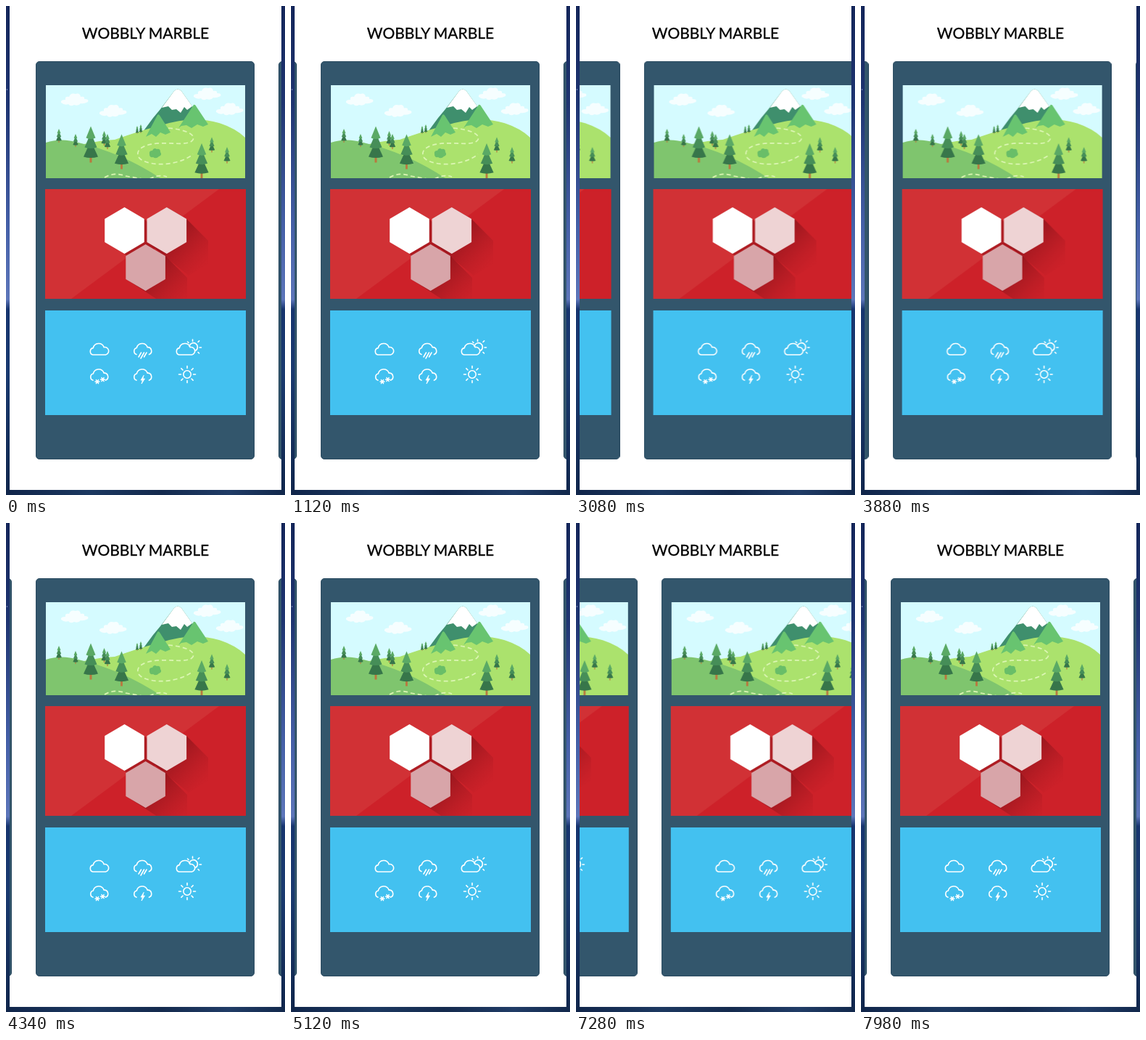
An HTML page for the animation above (8020 ms loop, 385 px wide and 673 px high).

```html
<!DOCTYPE html>
<html lang="en">
<head>
<meta charset="utf-8">
<title>Card carousel</title>
<style>
html, body { margin: 0; width: 100%; height: 100%; overflow: hidden; }
svg { display: block; width: 100%; height: 100%; }
.title { font: 21px Lato, "Open Sans", sans-serif; text-anchor: middle; stroke: #000; stroke-width: .3; }
.icons { fill: none; stroke: #fff; stroke-width: 1.6; stroke-linecap: round; stroke-linejoin: round; }
.trail { fill: none; stroke: #dcf6b4; stroke-width: 1.7; stroke-dasharray: 6 4; }

/* one page = 335px */
#strip { animation: swipe 8020ms cubic-bezier(.3, 0, .2, 1) infinite; }
@keyframes swipe {
  0%, 6.733% { transform: translateX(0); }
  13.965%, 21.696% { transform: translateX(-335px); }
  27.681%, 35.411% { transform: translateX(-670px); }
  40.898%, 48.13% { transform: translateX(-1005px); }
  54.115%, 58.603% { transform: translateX(-670px); }
  63.84%, 75.062% { transform: translateX(-335px); }
  79.8%, 88.529% { transform: translateX(-670px); }
  93.267%, 100% { transform: translateX(-1005px); }
}
</style>
</head>
<body>
<svg viewBox="0 0 385 673" preserveAspectRatio="none">
<defs>
  <linearGradient id="night" x1="0" y1="0" x2="0" y2="1">
    <stop offset="0" stop-color="#14265a"/>
    <stop offset=".2" stop-color="#1f3572"/>
    <stop offset=".45" stop-color="#4560a8"/>
    <stop offset=".6" stop-color="#5d76ba"/>
    <stop offset=".62" stop-color="#17356f"/>
    <stop offset=".75" stop-color="#1a3a70"/>
    <stop offset="1" stop-color="#10264c"/>
  </linearGradient>
  <linearGradient id="ground">
    <stop offset="0" stop-color="#10254a"/>
    <stop offset=".3" stop-color="#1c3860"/>
    <stop offset=".55" stop-color="#142a4e"/>
    <stop offset=".8" stop-color="#203c66"/>
    <stop offset="1" stop-color="#12284c"/>
  </linearGradient>
  <linearGradient id="shade" gradientUnits="userSpaceOnUse" x1="225" y1="320" x2="267" y2="362">
    <stop offset="0" stop-color="#8e141b" stop-opacity=".8"/>
    <stop offset="1" stop-color="#a81a22" stop-opacity=".04"/>
  </linearGradient>
  <linearGradient id="shade2" gradientUnits="userSpaceOnUse" x1="196" y1="371" x2="238" y2="413">
    <stop offset="0" stop-color="#8e141b" stop-opacity=".8"/>
    <stop offset="1" stop-color="#a81a22" stop-opacity=".04"/>
  </linearGradient>
  <clipPath id="screen"><path d="M5 0H380V666H5z"/></clipPath>
  <clipPath id="meadow"><path d="M55 109H330V237H55z"/></clipPath>
  <clipPath id="redBox"><path d="M54 252H331V403H54z"/></clipPath>

  <g id="tree">
    <path fill="#b9783f" d="M-1.5-8h3V0h-3z"/>
    <path fill="#37764a" d="M0-30L10-8Q0-5-10-8z"/>
    <path fill="#468e58" d="M0-41L8.5-21Q0-18-8.5-21z"/>
    <path fill="#5aa965" d="M0-50L6.5-34Q0-31-6.5-34z"/>
  </g>
  <path id="puff" fill="#fff" opacity=".8" d="M-19 4Q-20 0-13 0Q-14-5-8-4Q-6-10 1-8Q7-10 8-4Q14-5 13-1Q20-1 18 3Q12 6 8 5Q5 9-1 7Q-6 10-9 6Q-14 8-19 4z"/>
  <path id="hex" d="M0-32L27.3-16V16L0 32L-27.3 16V-16z"/>
  <path id="cloud" d="M-9 8A4.8 4.8 0 0 1-8.7-1.4A7.8 7.8 0 0 1 6.2-2.4A5.3 5.3 0 0 1 8.5 8z"/>
  <path id="openCloud" d="M-9 7.6A4.7 4.7 0 0 1-8.7-1.4A7.8 7.8 0 0 1 6.2-2.4A5.2 5.2 0 0 1 8.5 7.6"/>
  <path id="flake" stroke-width="1.4" d="M-3 0H3M-1.6-2.6L1.6 2.6M1.6-2.6L-1.6 2.6"/>

  <g id="scene" clip-path="url(#meadow)">
    <path fill="#d5fbff" d="M55 109H330V237H55z"/>
    <use href="#puff" x="95" y="129"/>
    <use href="#puff" x="148" y="144.500"/>
    <use href="#puff" x="278" y="121"/>
    <use href="#puff" x="309" y="142"/>
    <path fill="#3f8f6d" d="M186 177L203 154L213 142L232 117Q237 112 242 117L262 145L278 168V190H186z"/>
    <path fill="#fff" d="M215 140L232 117Q237 112 242 117L257 138L250 143L246 139L241 147L235 142L229 143L224 138z"/>
    <path fill="#abe26d" d="M55 205Q110 186 150 184Q190 170 215 164Q258 150 294 161Q316 168 330 181V237H55z"/>
    <path fill="#68c470" d="M259 136Q261 135 263 139L279 163L272 166L264 163L256 168L249 164L242 165L238 168z"/>
    <path fill="#68c470" d="M209 150Q211 148 213 152L227 174L220 177L213 174L207 180L201 176L193 180z"/>
    <path fill="#7fc56e" d="M55 188Q76 181 100 188Q160 202 213 237H55z"/>
    <path class="trail" d="M224 168C246 170 262 176 258 184C252 194 222 186 202 190C182 193 177 204 186 211C202 222 240 219 258 204"/>
    <path class="trail" d="M136 236Q150 228 165 234L188 238M198 238Q212 231 222 235"/>
    <path fill="#69be68" d="M198 204Q197 199 202 199Q204 194 208 197Q213 196 213 201Q216 205 211 207Q207 211 203 208Q198 209 198 204z"/>
    <use href="#tree" transform="translate(181 176) scale(.22)"/>
    <use href="#tree" transform="translate(186 175) scale(.24)"/>
    <use href="#tree" transform="translate(73 188) scale(.38)"/>
    <use href="#tree" transform="translate(96 194) scale(.36)"/>
    <use href="#tree" transform="translate(135.500 192) scale(.4)"/>
    <use href="#tree" transform="translate(140 197) scale(.42)"/>
    <use href="#tree" transform="translate(284 201.500) scale(.42)"/>
    <use href="#tree" transform="translate(305 216.500) scale(.45)"/>
    <use href="#tree" transform="translate(117 215.500)"/>
    <use href="#tree" transform="translate(159.500 224.500) scale(.96)"/>
    <use href="#tree" transform="translate(270 237) scale(.96)"/>
  </g>

  <g id="hexes" clip-path="url(#redBox)">
    <path fill="#cd2129" d="M54 252H331V403H54z"/>
    <path fill="#d13135" d="M54 252H294L90 403H54z"/>
    <path fill="url(#shade)" d="M222 277L249 293L279 323V355L252 371L195 325z"/>
    <path fill="url(#shade2)" d="M193 328L220 344L250 374V406H212L166 376z"/>
    <path fill="#a3171e" opacity=".75" d="M190.800 293L205 307V340L178 355L163.500 341z"/>
    <use href="#hex" x="163.500" y="309" fill="#fff"/>
    <use href="#hex" x="221.800" y="309" fill="#eed3d4"/>
    <use href="#hex" x="192.600" y="360" fill="#d8a5a9"/>
  </g>

  <g id="weather">
    <path fill="#43c1f0" d="M54 419H331V563H54z"/>
    <g class="icons">
      <use href="#cloud" x="129" y="472"/>
      <use href="#openCloud" x="189" y="472"/>
      <path d="M186.500 477L183 483M190.500 477L186 485M194 477L190.500 483"/>
      <use href="#cloud" x="248" y="472"/>
      <path d="M253 468.500A5.700 5.700 0 1 1 261 474.600M257.500 459V461.500M265 462.500L266.600 460.900M267 470H269.500M265 476.500L266.500 478M250.500 462L252 463.500"/>
      <use href="#openCloud" x="129" y="507.500"/>
      <use href="#flake" x="126" y="517"/>
      <use href="#flake" x="133.500" y="514"/>
      <use href="#openCloud" x="189" y="507.500"/>
      <path fill="#fff" stroke-width=".8" d="M190 508.500L186 515H188.500L187 520L191.500 513H189z"/>
      <circle cx="250" cy="507" r="5.200"/>
      <path d="M250 495.500V498.500M250 515.500V518.500M238.500 507H241.500M258.500 507H261.500M241.900 498.900L244 501M256 513L258.100 515.100M258.100 498.900L256 501M244 513L241.900 515.100"/>
    </g>
  </g>

  <g id="card">
    <rect x="41.500" y="76.500" width="301" height="547" rx="4.500" fill="#33566c" stroke="#2a4a60"/>
    <use href="#scene"/>
    <use href="#hexes"/>
    <use href="#weather"/>
  </g>
</defs>

<path fill="url(#night)" d="M0 0H385V673H0z"/>
<path fill="url(#ground)" d="M0 666H385V673H0z"/>
<circle cx="1.500" cy="115" r=".8" fill="#8f9dcc"/>
<path fill="#fff" d="M5 0H380V666H5z"/>
<text class="title" x="192.500" y="45">WOBBLY MARBLE</text>
<g clip-path="url(#screen)">
  <g id="strip">
    <use href="#card"/>
    <use href="#card" x="335"/>
    <use href="#card" x="670"/>
    <use href="#card" x="1005"/>
    <use href="#card" x="1340"/>
  </g>
</g>
</svg>
</body>
</html>
```
